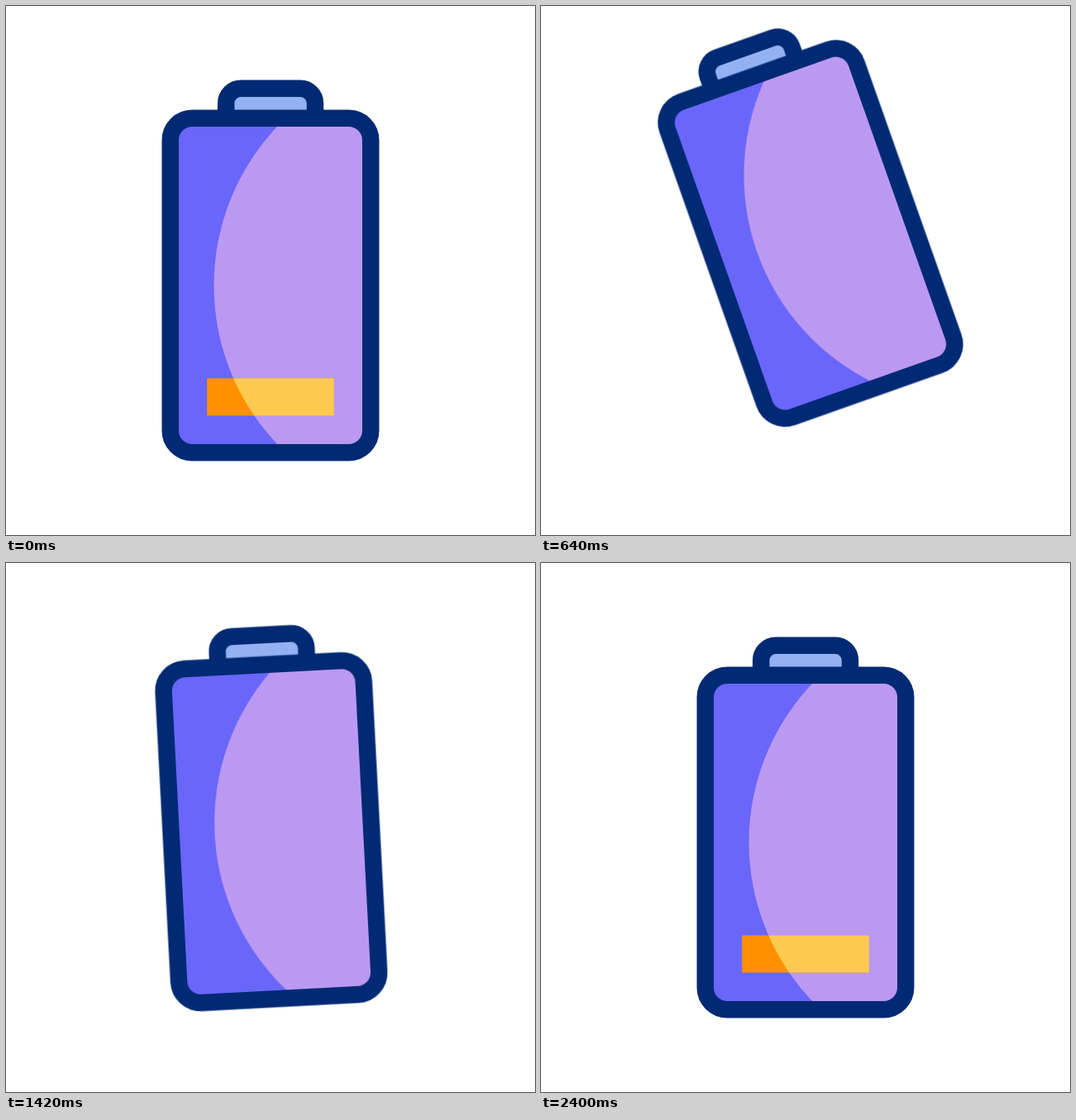
Animation of 640 by 640 pixels, one loop 2420 ms. Source, as an HTML page:

```html
<!DOCTYPE html>
<html lang="en">
<head>
<meta charset="utf-8">
<title>Low battery</title>
<style>
  html, body { margin: 0; width: 100%; height: 100%; overflow: hidden; background: #fff; }
  svg { display: block; width: 100%; height: 100%; }
  #battery { transform-origin: 320px 320px; }
  .line { fill: none; stroke: #022a74; stroke-width: 20.5; }
</style>
</head>
<body>
<svg viewBox="0 0 640 640">
  <defs>
    <rect id="case" x="198.75" y="135.75" width="242.5" height="404.5" rx="26.5"/>
    <rect id="charge" x="243.2" y="450.5" width="153.6" height="45"/>
    <clipPath id="inCase"><use href="#case"/></clipPath>
    <clipPath id="inCharge"><use href="#charge"/></clipPath>
  </defs>
  <g id="battery">
    <path class="line" style="fill:#93b1f3" d="M266.2 136V117.7a18 18 0 0 1 18-18h71.8a18 18 0 0 1 18 18V136"/>
    <use href="#case" fill="#6966f9"/>
    <circle cx="530.7" cy="338" r="279.2" fill="#bb99f2" clip-path="url(#inCase)"/>
    <g id="bar">
      <use href="#charge" fill="#ff9100"/>
      <circle cx="530.7" cy="338" r="279.2" fill="#fdca50" clip-path="url(#inCharge)"/>
    </g>
    <use href="#case" class="line"/>
  </g>
</svg>
<script>
  const LOOP = 2420;
  const timing = { duration: LOOP, iterations: Infinity };

  // time, vertical shift, rotation, easing towards the next pose
  const poses = [
    [0, 0, 0, 'cubic-bezier(.53,0,.775,1)'],
    [600, -64, -20, 'cubic-bezier(.42,0,.58,1)'],
    [1000, 38.4, 5, 'cubic-bezier(.43,0,.6,1)'],
    [1600, -25.6, -5, 'cubic-bezier(.3,0,.67,1)'],
    [2000, 0, 0, 'linear'],
    [LOOP, 0, 0, 'linear']
  ];
  const swing = poses.map(([t, y, deg, easing]) => ({
    offset: t / LOOP,
    transform: `translate(0px, ${y}px) rotate(${deg}deg)`,
    easing
  }));

  const blink = [];
  for (let t = 0; t <= 2400; t += 200) {
    blink.push({ offset: t / LOOP, opacity: t % 400 ? 0 : 1, easing: 'steps(1, end)' });
  }
  blink.push({ offset: 1, opacity: 1 });

  const moves = [
    document.getElementById('battery').animate(swing, timing),
    document.getElementById('bar').animate(blink, timing)
  ];
  const start = document.timeline.currentTime || 0;
  moves.forEach(move => { move.startTime = start; });
</script>
</body>
</html>
```
